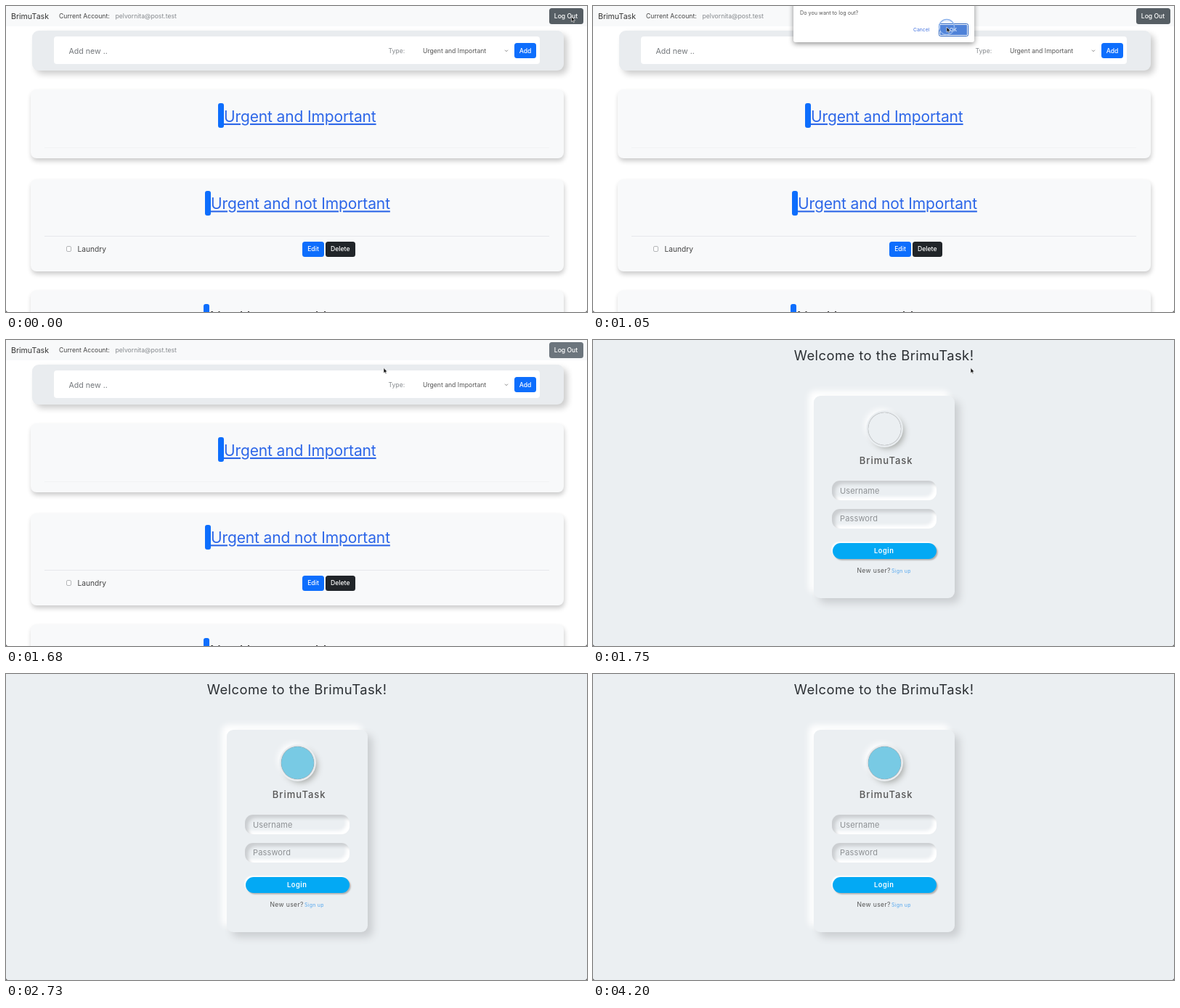
An HTML page for the animation above (4.27 s loop, 800 by 422 pixels).

```html
<!DOCTYPE html>
<html lang="en">
<head>
<meta charset="utf-8">
<title>To-do list log out</title>
<style>
  html, body { margin: 0; width: 100%; height: 100%; overflow: hidden; background: #fff; }
  .scene, .scene > div, svg { position: absolute; box-sizing: border-box; }
  .scene, svg { left: 0; top: 0; width: 800px; height: 422px; overflow: hidden; }
  text { font-family: Inter, "Liberation Sans", sans-serif; font-size: 8.65px; white-space: pre; }
  [hidden] { display: none; }

  #list { background: #fff; }
  .nav { background: #f8f9fa; }
  .panel { background: #e9ecef; border-radius: 9px; box-shadow: 5px 5px 9px rgba(0,0,0,.2); }
  .field { background: #fff; border-radius: 4px; }
  .card { background: #f8f9fa; border-radius: 8px; box-shadow: 1px 4px 6px rgba(0,0,0,.2); }
  .btn { border-radius: 3.5px; background: #0d6efd; }
  .dark { background: #212529; }
  .bar { border-radius: 3px; background: #0d6efd; }
  .rule { background: #e6e8eb; }
  .check { border: 1px solid #b4b6b8; border-radius: 2px; background: #fff; }
  .label { fill: #fff; font-weight: 500; text-anchor: middle; }
  .heading { font-size: 21px; letter-spacing: -.13px; fill: #2c66e8; text-decoration: underline; }
  .brand, .entry { font-size: 10.6px; }
  .muted { fill: #85898d; }

  .dialog { background: #fff; border-radius: 3px; box-shadow: 0 2px 7px rgba(0,0,0,.45); }
  .ok { border: 1.5px solid #2a62bd; border-radius: 2.5px; padding: 1px; background: #1a73e8 content-box; }

  #login { background: #ebeff2; }
  #login text { fill: #555; }
  .sheet { background: #ebeff2; border-radius: 9px;
    box-shadow: 7px 7px 11px #cbced1, -7px -7px 9px #fff; }
  .logo { border-radius: 50%;
    box-shadow: 0 0 1.2px #5f5f5f, 0 0 0 2.9px #ebeff2, 4.6px 4.6px 8.6px #a7aaa7, -4.6px -4.6px 8.6px #fff; }
  .input { border-radius: 11px; box-shadow: inset 4.6px 4.6px 4.6px #cbced1, inset -4.6px -4.6px 4.6px #fff; }
  .submit { border-radius: 11px; background: #03a9f4; box-shadow: 1.7px 1.7px 1.7px #b1b1b1, -1.7px -1.7px 1.7px #fff; }
  #login .placeholder { font-size: 11px; letter-spacing: .15px; fill: #8e9194; }
</style>
</head>
<body>
<div class="scene" id="list">
  <div class="nav" data-box="0 0 800 28"></div>
  <div class="btn" id="logout" data-box="748 3 46.5 21.5"></div>
  <div class="panel" data-box="36 34 732 55"></div>
  <div class="field" data-box="66 42 669 38"></div>
  <div class="btn" data-box="700 51 30 21"></div>

  <div class="card" data-box="34 115 734 95"></div>
  <div class="bar" data-box="292 134 8 34"></div>
  <div class="rule" data-box="53 195 695 1" style="opacity:.4"></div>

  <div class="card" data-box="34 239 734 127"></div>
  <div class="bar" data-box="273.5 255 8 34"></div>
  <div class="rule" data-box="53 316.5 695 1"></div>
  <div class="check" data-box="82.5 331 7.5 7.5"></div>
  <div class="btn" data-box="408 324.5 30 21"></div>
  <div class="btn dark" data-box="440 324.5 40.5 21"></div>

  <div class="card" data-box="34 392 734 95"></div>
  <div class="bar" data-box="272 411 8 34"></div>
  <svg>
    <text class="brand" x="7" y="18" fill="#333">BrimuTask</text>
    <text x="73" y="17" fill="#444">Current Account:</text>
    <text class="muted" x="150.5" y="17">pelvornita@post.test</text>
    <text class="label" x="771" y="17">Log Out</text>
    <text class="entry" x="86.5" y="65.5" fill="#74787c">Add new ..</text>
    <text class="muted" x="526.5" y="65">Type:</text>
    <text x="574" y="65" fill="#555">Urgent and Important</text>
    <path d="M687 60.7l2 2 2-2" fill="none" stroke="#666" stroke-width=".8"/>
    <text class="label" x="715" y="65">Add</text>
    <text class="heading" x="300" y="160">Urgent and Important</text>
    <text class="heading" x="282" y="280.3">Urgent and not Important</text>
    <text class="entry" x="98.5" y="339" fill="#444" style="font-size:10.2px">Laundry</text>
    <text class="label" x="423" y="338.3">Edit</text>
    <text class="label" x="460.3" y="338.3">Delete</text>
    <text class="heading" x="280.5" y="437" style="fill:#333">Not Urgent and Important</text>
  </svg>
</div>

<div class="scene" id="prompt">
  <div class="dialog" data-box="276 -8 249 58"></div>
  <div class="ok" id="ok" data-box="475.5 23.5 41.5 18.5"></div>
  <svg>
    <text x="285" y="12" fill="#555" style="font-size:7.2px">Do you want to log out?</text>
    <text x="441" y="35" fill="#4776e0" style="font-size:6.8px">Cancel</text>
    <text class="label" x="496" y="35" style="font-size:6.8px">OK</text>
  </svg>
</div>

<div class="scene" id="login">
  <div class="sheet" data-box="304 77 194 279"></div>
  <div class="logo" id="logo" data-box="378.5 99.5 45 45"></div>
  <div class="input" data-box="329 194 144 27"></div>
  <div class="input" data-box="329 232.5 144 27"></div>
  <div class="submit" data-box="329.5 280 143 21.7"></div>
  <svg>
    <text x="400.6" y="28" text-anchor="middle" style="font-size:18.4px;letter-spacing:.45px;fill:#2b2f33">Welcome to the BrimuTask!</text>
    <text x="403.7" y="171" text-anchor="middle" style="font-size:13px;letter-spacing:1px;font-weight:500">BrimuTask</text>
    <text class="placeholder" x="340" y="211.7">Username</text>
    <text class="placeholder" x="340" y="250">Password</text>
    <text x="400.7" y="294" text-anchor="middle" style="font-size:9.2px;letter-spacing:.55px;font-weight:600;fill:#fff">Login</text>
    <text x="363.5" y="320.5" style="letter-spacing:.35px">New user?</text>
    <text x="411" y="320.5" style="font-size:7px;letter-spacing:.25px;fill:#58a9ef">Sign up</text>
  </svg>
</div>

<svg>
  <circle id="ring" r="10.5" fill="#6ea0f0" fill-opacity=".12" stroke="#8fb4ec" stroke-width="1.5"/>
  <path id="cursor" d="M0 0V7.2L1.7 5.7 2.9 8.3 4 7.8 2.9 5.3H5.1Z" fill="#111" stroke="#fff" stroke-width=".6"/>
  <path d="M0 419.5Q.3 421.7 2.5 422H0ZM800 419.5Q799.7 421.7 797.5 422H800Z" fill="#555"/>
</svg>

<script>
const LOOP = 4270, STEP = 70;
const $ = id => document.getElementById(id);

for (const el of document.querySelectorAll('[data-box]')) {
  const [left, top, width, height] = el.dataset.box.split(' ').map(n => n + 'px');
  Object.assign(el.style, { left, top, width, height });
}

// time, x, y of the pointer tip
const path = [
  [0, 778.5, 14.5], [210, 778.5, 14.5], [490, 488, 25], [630, 487.5, 25.5],
  [840, 487, 29], [1190, 487, 29], [1540, 520, 38.5], [1890, 520, 38.5], [2170, 545, -12],
];
const clicks = [[70, 210], [980, 1120]];
const ease = k => k * k * (3 - 2 * k);
const within = (t, [from, to]) => t >= from && t < to;
const show = (id, visible) => $(id).toggleAttribute('hidden', !visible);

function pointerAt(t) {
  const i = path.findIndex(p => p[0] > t);
  if (i < 0) return path[path.length - 1].slice(1);
  const [t0, x0, y0] = path[i - 1], [t1, x1, y1] = path[i];
  const k = ease((t - t0) / (t1 - t0));
  return [x0 + (x1 - x0) * k, y0 + (y1 - y0) * k];
}

function draw(now) {
  const t = Math.floor(now % LOOP / STEP) * STEP;
  const [x, y] = pointerAt(t);
  const onLogin = t >= 1750;
  show('list', !onLogin);
  show('login', onLogin);
  show('prompt', within(t, [210, 1190]));
  show('ring', clicks.some(c => within(t, c)));
  show('cursor', t < 2170);
  $('cursor').setAttribute('transform', `translate(${x} ${y})`);
  $('ring').setAttribute('transform', `translate(${x} ${y})`);
  $('logout').style.background = t < 1190 ? '#565e64' : '#6c757d';
  $('ok').style.backgroundColor = t >= 980 ? '#4f82d8' : '#1a73e8';
  $('logo').style.background = t >= 1820 ? '#78cae4' : '#ebeff2';
}

function tick() {
  draw(performance.now());
  requestAnimationFrame(tick);
}
tick();
</script>
</body>
</html>
```
